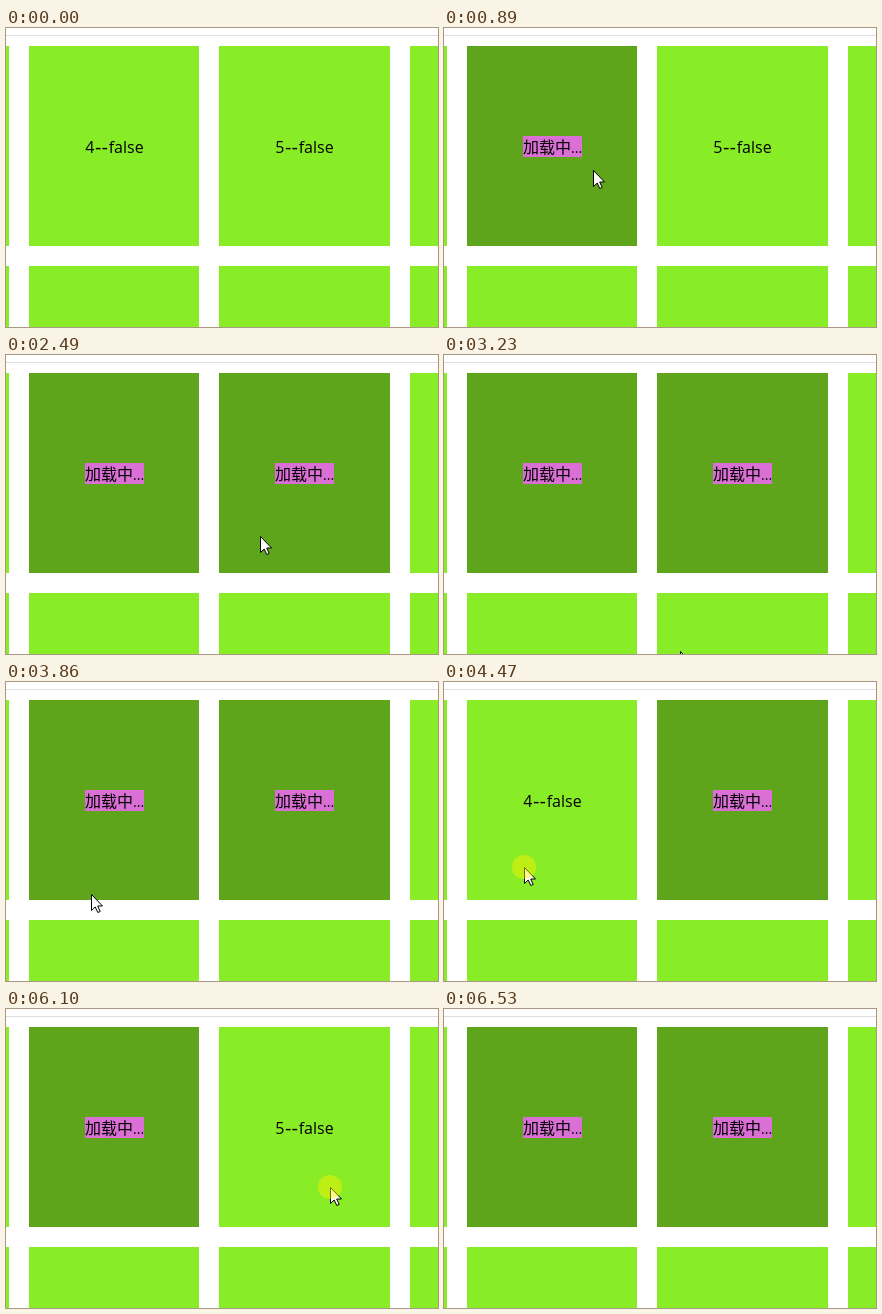
An HTML page with a canvas that plays this animation: 432 px wide and 299 px high, repeating every 7.13 s.

```html
<!DOCTYPE html>
<html lang="zh">
<head>
<meta charset="utf-8">
<title>Loading cards</title>
<style>
html, body { margin: 0; width: 100%; height: 100%; overflow: hidden; background: #fff; }
canvas { display: block; }
</style>
</head>
<body>
<canvas id="stage" width="432" height="299"></canvas>
<script>
const ctx = document.getElementById('stage').getContext('2d');
const LOOP = 7130, STEP = 68, PRESS = 70;
const GREEN = '#88ec27', DARK = '#5fa51b', PINK = '#da70d6';
const LATIN = '16px "Open Sans", sans-serif';

// Loading spans of the two labelled cards; a click comes just before each
const busy = {
  4: [[890, 3930], [4540, LOOP]],
  5: [[2490, 5570], [6170, LOOP]]
};
const clicks = Object.values(busy).flat().map(([from]) => from - PRESS);

// Pointer moves: from, to, x, y, sag of the arc
const entry = [293, 288];
const moves = [
  [130, 540, 149, 142],
  [890, 1230, 165, 207],
  [1820, 2090, 254, 181],
  [2490, 2830, 250, 300],
  [3090, 3860, 85, 212, 10],
  [4060, 4400, 80, 185],
  [4540, 4820, 280, 267, 60],
  [4820, 5310, 324, 178],
  [6170, 6530, 395, 330]
];
const arrow = new Path2D('M.5 .5V16.5L4.2 13L6.8 18.5L9.2 17.5L6.7 12H11.5Z');

const ease = u => u * u * (3 - 2 * u);

function pointerAt(t) {
  let [x, y] = entry;
  for (const [from, to, x1, y1, sag = 0] of moves) {
    if (t < from) break;
    const held = Math.floor((t - from) / STEP) * STEP;
    const u = t >= to ? 1 : ease(held / (to - from));
    x += (x1 - x) * u;
    y += (y1 - y) * u + sag * 4 * u * (1 - u);
  }
  return [Math.round(x), Math.round(y)];
}

function rect(color, x, y, w, h) {
  ctx.fillStyle = color;
  ctx.fillRect(x, y, w, h);
}

function text(str, x, font) {
  ctx.fillStyle = '#000';
  ctx.font = font;
  ctx.fillText(str, x, 125);
}

function drawCard(id, t) {
  const x = Math.round(23 + (id - 4) * 190.4);
  const w = Math.round(23 + (id - 3) * 190.4) - 20 - x;
  const loading = busy[id]?.some(([from, to]) => t >= from && t < to);
  rect(loading ? DARK : GREEN, x, 18, w, 200);
  rect(GREEN, x, 238, w, 200);
  if (loading) {
    rect(PINK, x + 56, 108, 59, 21);
    text('加载中', x + 56, '300 16px "Noto Sans CJK SC", "Noto Sans CJK", sans-serif');
    text('...', x + 104, '14px "Open Sans", sans-serif');
  } else if (busy[id]) {
    text(id, x + 56.3, LATIN);
    text('--', x + 66, '18px "DejaVu Sans", sans-serif');
    text('false', x + 79.7, LATIN);
  }
}

function drawPointer(t) {
  ctx.save();
  ctx.translate(...pointerAt(t));
  ctx.fillStyle = '#fff';
  ctx.strokeStyle = '#000';
  ctx.fill(arrow);
  ctx.stroke(arrow);
  if (clicks.some(c => t >= c && t < c + PRESS)) {
    ctx.fillStyle = 'rgba(255, 245, 0, .45)';
    ctx.beginPath();
    ctx.arc(0, 0, 12, 0, 7);
    ctx.fill();
  }
  ctx.restore();
}

function draw(now) {
  const t = now % LOOP;
  rect('#fff', 0, 0, 432, 299);
  rect('#ddd', 0, 7, 432, 1);
  for (let id = 3; id <= 6; id++) drawCard(id, t);
  if (t >= moves[0][0]) drawPointer(t);
}

let start;
function frame(now) {
  start ??= now;
  draw(now - start);
  requestAnimationFrame(frame);
}
draw(0);
requestAnimationFrame(frame);
</script>
</body>
</html>
```
